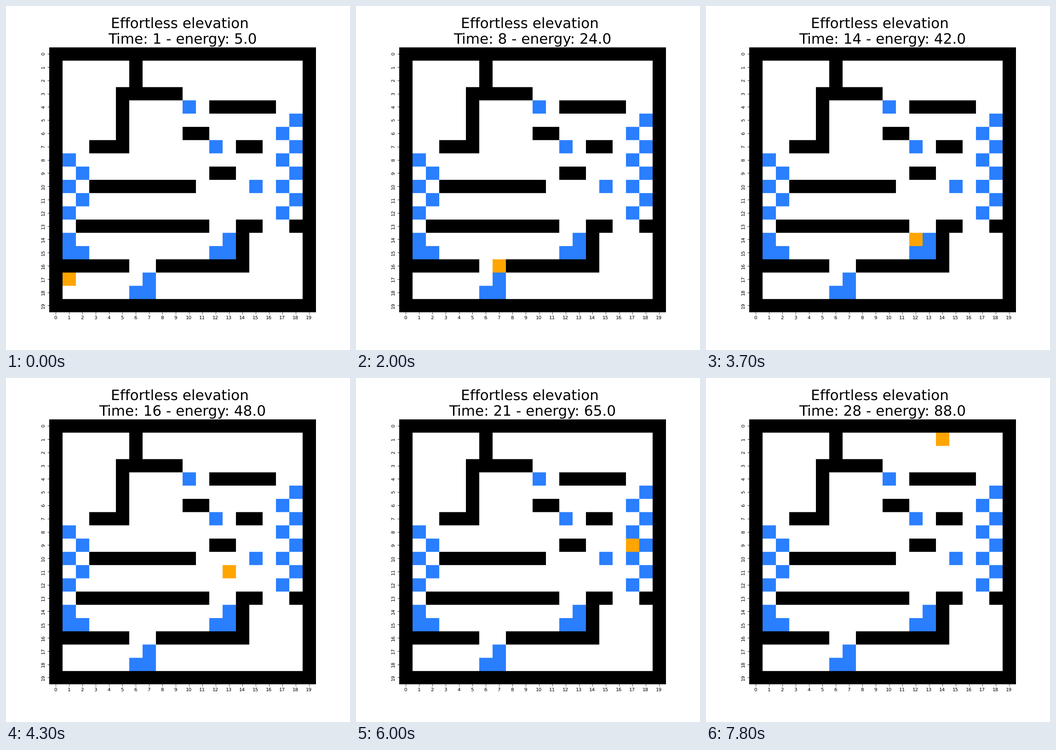
These frames come from a looping animation (748x748 px, 8000 ms). A matplotlib script:

```python
import numpy as np
import matplotlib.pyplot as plt
from matplotlib.animation import FuncAnimation
from matplotlib.colors import to_rgb

plt.rcParams["font.family"] = "DejaVu Sans"
plt.rcParams["text.hinting"] = "none"

SIZE = 20
TICKS, TICK_MS = 80, 100
FREE, WALL, LIFT, AGENT = range(4)
PALETTE = np.array([to_rgb(c) for c in ("white", "black", "#2a7fff", "orange")])
DETAIL = 40  # image pixels per cell, smoothed down to the axes size

START = (1, 17)
STEP = {"R": (1, 0), "L": (-1, 0), "U": (0, -1), "D": (0, 1)}
HOPS = "RD RU "
# One word per turn: hop along, climb the shaft, drift back left
PATH = (HOPS * 2 + "RU RD UU RU RD " + HOPS + "U RU RU U " + "RD RU " * 2
        + "UU " + "UU U " * 2 + "LU LU L").split()
# Pace: key turns and the tick on which they begin
KEY_TURNS = 1, 13, 14, 17, 18, 20, 22, 26, 28
KEY_TICKS = -1.6, 34.6, 36.6, 45.6, 49.6, 55.4, 61.4, 70.9, 77.6
HALF_TURN = 1.5


def build_grid():
    grid = np.full((SIZE, SIZE), WALL)
    grid[1:-1, 1:-1] = FREE

    def ledge(row, first, last):
        grid[row, first:last + 1] = WALL

    def pillar(col, first, last):
        grid[first:last + 1, col] = WALL

    def stairs(row, col, side):
        grid[row + 1, col:col + 2] = LIFT
        grid[row, col + side] = LIFT

    def tower(col, first, last):
        for row in range(first, last + 1):
            grid[row, col + row % 2] = LIFT

    pillar(6, 1, 2)
    pillar(5, 3, 7)
    pillar(14, 13, 16)
    ledge(3, 5, 9)
    ledge(4, 12, 16)
    ledge(6, 10, 11)
    ledge(7, 3, 5)
    ledge(7, 14, 15)
    ledge(9, 12, 13)
    ledge(10, 3, 10)
    ledge(13, 2, 11)
    ledge(13, 14, 15)
    ledge(13, 18, 18)
    ledge(16, 1, 5)
    ledge(16, 8, 14)

    tower(1, 8, 12)
    tower(17, 5, 12)
    stairs(14, 1, 0)
    stairs(14, 12, 1)
    stairs(17, 6, 1)
    for row, col in (4, 10), (7, 12), (10, 15):
        grid[row, col] = LIFT
    return grid


def build_timeline():
    """Return (turn, energy, column, row) for every tick."""
    x, y = START
    timeline = [(1, 5.0, x, y)] * TICKS
    for turn, moves in enumerate(PATH, 2):
        begin = np.interp(turn, KEY_TURNS, KEY_TICKS)
        climb = min(max(turn - 21, 0), 4)  # climbing costs one more per turn
        for i, move in enumerate(moves):
            dx, dy = STEP[move]
            x, y = x + dx, y + dy
            tick = int(np.ceil(begin + i * HALF_TURN))
            state = (turn, 3.0 * turn + climb + 2 * i, x, y)
            timeline[tick:] = [state] * (TICKS - tick)
    return timeline


def picture(cells):
    return PALETTE[cells].repeat(DETAIL, 0).repeat(DETAIL, 1)


GRID = build_grid()
TIMELINE = build_timeline()

fig, ax = plt.subplots(figsize=(10, 10), dpi=74.8)
board = ax.imshow(picture(GRID), extent=(0, SIZE, SIZE, 0), aspect="auto",
                  interpolation="hanning")
centers = np.arange(SIZE) + 0.5
ax.set_xticks(centers, range(SIZE))
ax.set_yticks(centers, range(SIZE), rotation=90, va="center")
ax.spines[:].set_visible(False)
title = ax.set_title("", fontsize=30, pad=6.5, linespacing=1.25)


def draw(tick):
    turn, energy, x, y = TIMELINE[tick]
    cells = GRID.copy()
    cells[y, x] = AGENT
    board.set_data(picture(cells))
    # the trailing space is part of the centred heading
    title.set_text(f"Effortless elevation \nTime: {turn} - energy: {energy}")
    return board, title


anim = FuncAnimation(fig, draw, frames=TICKS, interval=TICK_MS,
                     repeat=True, repeat_delay=0)
plt.show()
```
